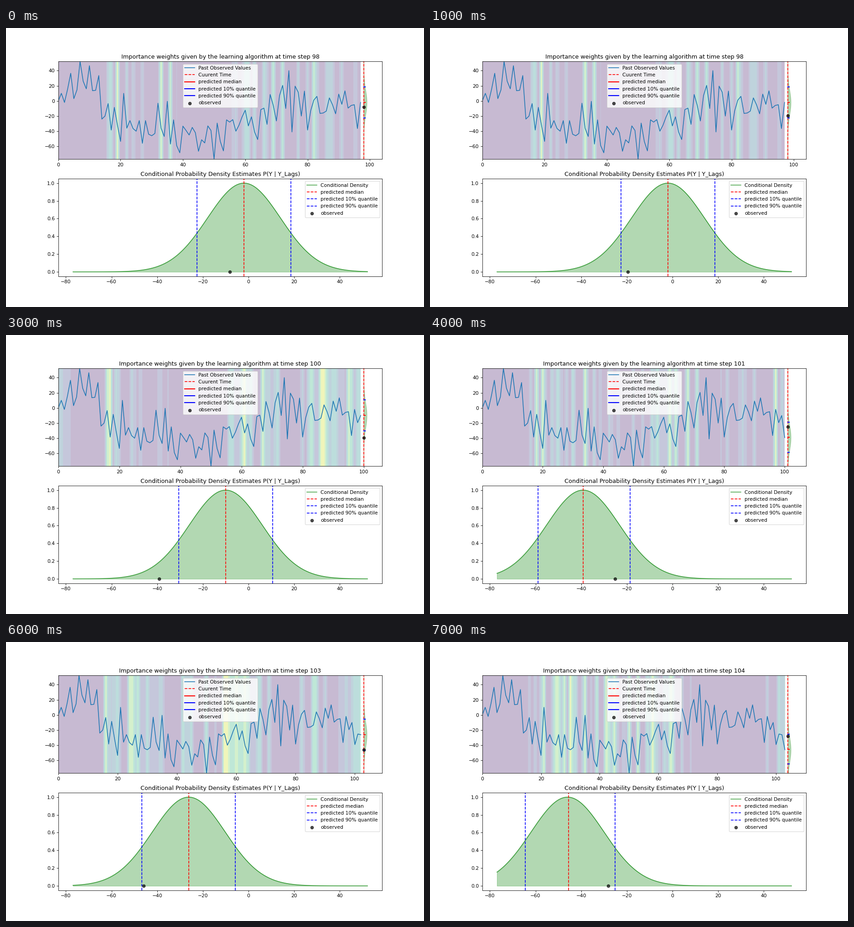
A matplotlib script that plays this animation: 917 px wide and 611 px high, repeating every 8 s.

```python
import numpy as np
import matplotlib.pyplot as plt
from matplotlib.animation import FuncAnimation

DPI = 917 / 12
BANDWIDTH = 16
STEPS = [98, 98, 99, 100, 101, 102, 103, 104]
FIRST_OBSERVED = -8.2

SERIES = np.array([
    0, 10, -2, 15.5, 36.5, 3, 14.5, 52.1, 26, 16,
    46.5, 13.5, 14, 33.5, -24, -20, -3.5, -38.5, -8.5, -32,
    -53.5, 10, -36, -26, -36.5, -40, -26, -56, -26, -44,
    -46, -43, -3, -36, -47, -0.5, -57, -25, -59, -68.5,
    -33.3, -39, -45, -35, -42, -66.5, -51.3, -55.5, -33, -39,
    -76.9, -29.3, -53.5, -66, -25, -28, -24.7, -40, -32, -21,
    -12.3, -33, -21, -41, -51, -11.5, -9.5, -31, 8.5, -6,
    -26.5, 7, 20.5, -10, 40, -41, 19.5, 11.5, -20, 13,
    -38.5, -13, 1, 6, -16.5, -16, -13.5, 4, -5, -17,
    9, -4.5, 13.3, -9.5, -6, -5, -36.5, -2, -19.5, -10,
    -39.2, -25.2, -26.2, -46, -28.2])

LOW, HIGH = SERIES.min(), SERIES.max()
GRID = np.linspace(LOW, HIGH, 1000)
PADDED = np.concatenate([[0, 0], SERIES])

fig, (top, bottom) = plt.subplots(2, 1, figsize=(12, 611.02 / DPI), dpi=DPI)


def kernel(sq_dist):
    return np.exp(-sq_dist / (2 * BANDWIDTH ** 2))


def lag_weights(step):
    """Similarity of each past pair of lags to the current pair."""
    lag1, lag2 = PADDED[1:step + 2], PADDED[:step + 1]
    sq_dist = (lag1 - lag1[-1]) ** 2 + (lag2 - lag2[-1]) ** 2
    return kernel(sq_dist[:-1])


def quantiles(density):
    cdf = np.cumsum(density) / density.sum()
    return [GRID[np.searchsorted(cdf, q)] for q in (0.5, 0.1, 0.9)]


MARKS = [("red", "predicted median"),
         ("blue", "predicted 10% quantile"),
         ("blue", "predicted 90% quantile")]


def draw_top(step, density, levels, observed):
    top.clear()
    past = np.arange(step)
    top.contourf(past, [LOW, HIGH], np.tile(lag_weights(step), (2, 1)),
                 alpha=0.3)
    top.plot(past, SERIES[:step], label="Past Observed Values")
    top.axvline(step, color="red", ls="--", label="Cuurent Time")
    top.fill_betweenx(GRID, step, step + density, color="green", alpha=0.3)
    for value, (color, label) in zip(levels, MARKS):
        top.plot([step, step + 0.5], [value, value], color=color, lw=2,
                 label=label)
    top.scatter([step], [observed], color="black", alpha=0.7, zorder=3,
                label="observed")
    top.set_xlim(0, 1.05 * (step + 1))
    top.set_ylim(LOW, HIGH)
    top.set_title("Importance weights given by the learning algorithm "
                  f"at time step {step}")
    top.legend(loc="upper center")


def draw_bottom(density, levels, observed):
    bottom.clear()
    bottom.plot(GRID, density, color="green", alpha=0.7,
                label="Conditional Density")
    bottom.fill_between(GRID, 0, density, color="green", alpha=0.3)
    for value, (color, label) in zip(levels, MARKS):
        bottom.axvline(value, color=color, ls="--", label=label)
    bottom.scatter([observed], [0], color="black", alpha=0.7, zorder=3,
                   label="observed")
    margin = 0.05 * (HIGH - LOW)
    bottom.set_xlim(LOW - margin, HIGH + margin)
    bottom.set_ylim(-0.05, 1.05)
    bottom.set_title("Conditional Probability Density Estimates P(Y | Y_Lags)")
    bottom.legend(loc="upper right")


def draw(frame):
    step = STEPS[frame]
    observed = SERIES[step] if frame else FIRST_OBSERVED
    density = kernel((GRID - SERIES[step - 1]) ** 2)
    levels = quantiles(density)
    draw_top(step, density, levels, observed)
    draw_bottom(density, levels, observed)
    return []


anim = FuncAnimation(fig, draw, frames=len(STEPS), interval=1000,
                     init_func=lambda: [], repeat=True, repeat_delay=0)
plt.show()
```
